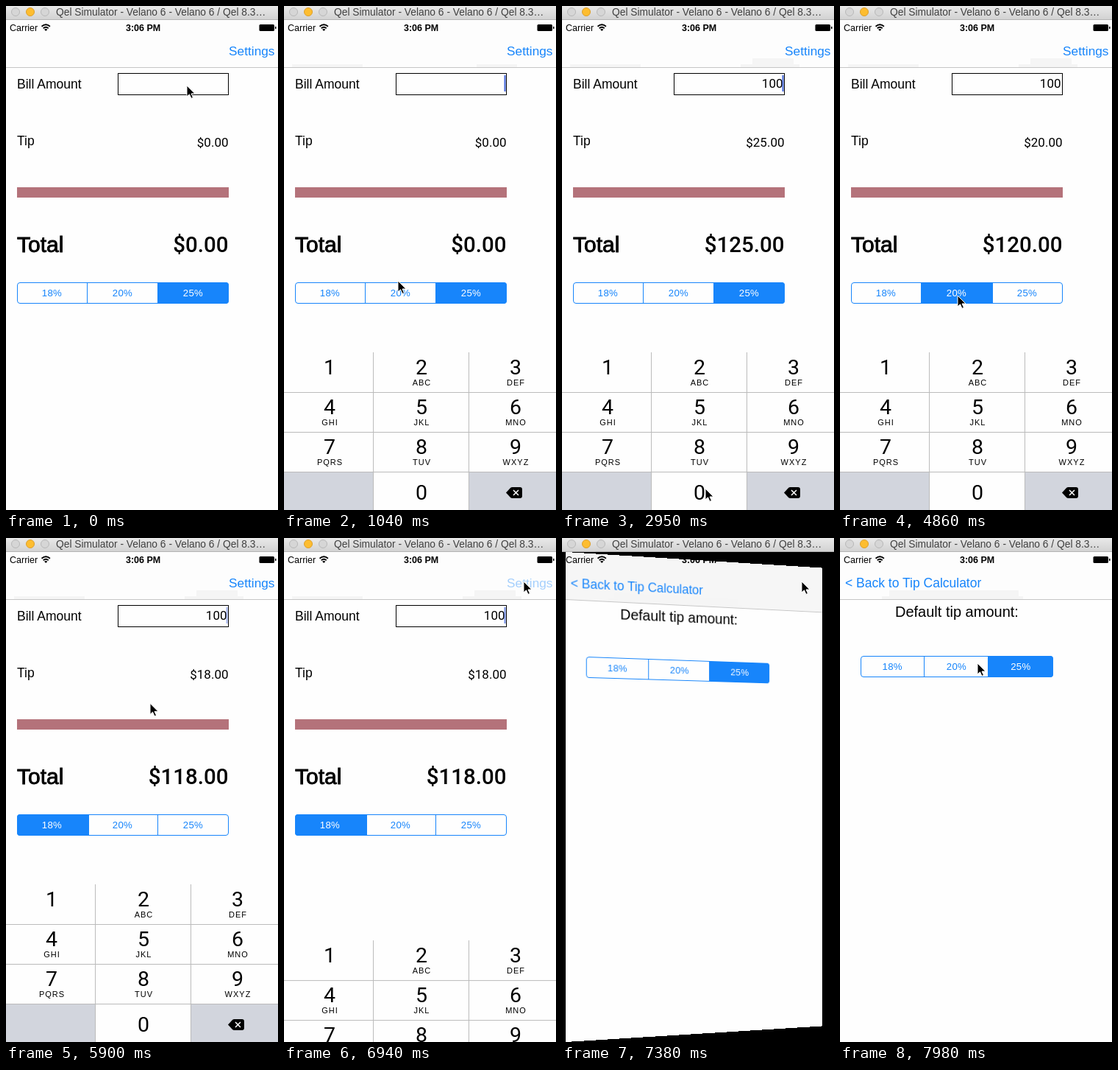
Animation, 370 px wide and 684 px high, one loop 8000 ms. Source, as an HTML page:

```html
<!DOCTYPE html>
<html lang="en">
<head>
<meta charset="utf-8">
<title>Tip calculator</title>
<style>
html, body { margin: 0; width: 370px; height: 684px; overflow: hidden; background: #000; }
svg { position: absolute; left: 0; display: block; overflow: hidden; }
text { font-family: "Liberation Sans", Arial, sans-serif; white-space: pre; }
.num { font-family: Roboto, Arial, sans-serif; }
#screens { position: absolute; top: 19px; width: 370px; height: 665px; overflow: hidden;
  background: #000; perspective: 1185px; perspective-origin: 186px 50%; }
#screens svg { top: 0; backface-visibility: hidden; transform-origin: 186px 50%; }
#top { top: 0; }
</style>
</head>
<body>
<div id="screens"></div>
<svg id="top" width="370" height="684"></svg>
<script>
const BLUE = '#1785fb', GREY = '#d2d5dd', HAZE = '#f5f5f5', LOOP = 8000;
const $ = id => document.getElementById(id);

const rect = (x, y, w, h, fill, more = '') =>
  `<rect x="${x}" y="${y}" width="${w}" height="${h}" fill="${fill}" ${more}/>`;
const text = (x, y, size, str, more = '') =>
  `<text x="${x}" y="${y}" font-size="${size}" ${more}>${str}</text>`;
const END = 'text-anchor="end"', MID = 'text-anchor="middle"', NUM = 'class="num"';

function segments(id, x, y, w, selected) {
  const cell = w / 3, edge = i => i ? Math.floor(x + cell * i) - 1 : x;
  let out = `<clipPath id="${id}">${rect(x, y, w, 29, '#000', 'rx="4"')}</clipPath>` +
    `<g clip-path="url(#${id})">${rect(edge(selected), y, cell + 2, 29, BLUE)}</g>` +
    rect(x + .5, y + .5, w - 1, 28, 'none', `rx="3.5" stroke="${BLUE}"`);
  ['18%', '20%', '25%'].forEach((label, i) => {
    if (i) out += rect(edge(i), y, 1, 29, BLUE);
    out += text(x + cell * (i + .5) - .5, y + 19, 13.2, label,
      `${MID} letter-spacing=".3" fill="${i === selected ? '#fff' : BLUE}"`);
  });
  return out;
}

function keypad() {
  const cols = [62, 187, 315], row = i => 470 + 54 * i;
  const letters = ['', 'ABC', 'DEF', 'GHI', 'JKL', 'MNO', 'PQRS', 'TUV', 'WXYZ'];
  const digit = (x, y, n) => text(x, y, 28.5, n, `${MID} ${NUM}`);
  let out = rect(0, 470, 370, 214, '#fefefe') +
    rect(0, 632, 121, 52, GREY) + rect(252, 632, 118, 52, GREY) +
    rect(0, 470, 121, 54, GREY, 'id="key1"') + rect(122, 633, 129, 51, GREY, 'id="key0"');
  for (let i = 1; i < 4; i++) out += rect(0, row(i), 370, 1, '#bbb');
  for (const x of [121, 251]) out += rect(x, 470, 1, 214, '#bbb');
  letters.forEach((word, i) => {
    const x = cols[i % 3], y = row(Math.floor(i / 3));
    out += digit(x, y + 30, i + 1) + text(x + .5, y + 45, 11, word, `${MID} letter-spacing="1"`);
  });
  return out + digit(187, 670, 0) +
    '<path d="M302 660.5l6-6.5q1-1 2.5-1h10.5q3 0 3 3v9q0 3-3 3h-10.5q-1.5 0-2.5-1z"/>' +
    '<path d="M312 657l7 7m0-7l-7 7" stroke="#fff" stroke-width="1.5"/>';
}

const page = (id, body) =>
  `<svg id="${id}" width="370" height="665" viewBox="0 19 370 665">${rect(0, 19, 370, 665, '#fefefe')}${body}</svg>`;
const nav = id => rect(0, 19, 370, 64, '#fdfdfd', `id="${id}"`) + rect(0, 83, 370, 1, '#c6c6c6');

$('screens').innerHTML = page('calc',
  nav('calcNav') +
  `<g id="haze">${rect(11, 79, 96, 4, HAZE)}${rect(262, 79, 55, 4, HAZE)}</g>` +
  `<g id="amountHaze">${rect(243, 79, 80, 4, HAZE)}${rect(259, 71, 56, 8, HAZE)}</g>` +
  text(365.5, 67, 17.3, 'Settings', `${END} id="settings" fill="${BLUE}"`) +
  text(15, 112, 17.5, 'Bill Amount') +
  rect(152.5, 91.5, 150, 29, '#fefefe', 'stroke="#000"') +
  text(300.5, 111, 17, '', `${END} ${NUM} id="bill"`) +
  rect(299.5, 94, 2, 22, '#4468dd', 'id="caret"') +
  text(15, 189, 17.5, 'Tip') + text(302.5, 191, 17, '', `${END} ${NUM} id="tip"`) +
  rect(15, 246, 288, 14, '#b4727a') +
  text(15, 333.5, 30, 'Total', 'stroke="#000" stroke-width=".9"') +
  text(302.5, 333.5, 29.5, '', `${END} ${NUM} font-weight="500" id="total"`) +
  `<g id="choice"></g><g id="keys">${keypad()}</g>`) +
page('prefs',
  nav('prefsNav') + rect(67, 71, 176, 8, HAZE) + rect(57, 79, 192, 4, HAZE) +
  text(7, 67, 17.5, '&lt; Back to Tip Calculator', `fill="${BLUE}"`) +
  text(75, 107, 20, 'Default tip amount:') +
  segments('prefClip', 28, 160, 262, 2));

const light = (x, fill, line) => `<circle cx="${x}" cy="8" r="5.5" fill="${fill}" stroke="${line}"/>`;
$('top').innerHTML =
  '<linearGradient id="chrome" x2="0" y2="1"><stop stop-color="#e9e9e9"/><stop offset="1" stop-color="#d1d1d1"/></linearGradient>' +
  rect(0, 0, 370, 19, 'url(#chrome)') + rect(0, 18, 370, 1, '#b4b4b4') +
  light(13, '#d6d6d6', '#b8b8b8') + light(33, '#fdbd30', '#dd9f2b') + light(53, '#d6d6d6', '#b8b8b8') +
  text(68, 13, 13.8, 'Qel Simulator - Velano 6 - Velano 6 / Qel 8.3…', 'fill="#404040"') +
  text(5, 33.5, 12.5, 'Carrier') +
  '<path d="M48.5 27.8q5.7-5 11.4 0M50.7 30.3q3.5-3 7 0" fill="none" stroke="#000" stroke-width="1.8"/>' +
  '<path d="M54.2 34l-2.2-2.2q2.2-1.8 4.4 0z"/>' +
  text(163, 33.5, 12.5, '3:06 PM', 'font-weight="bold"') +
  rect(344.5, 25, 20.5, 9, '#000', 'rx="1.5"') + rect(366, 28, 1.5, 3, '#000') +
  '<path id="cursor" d="M0 0V15L3.5 11.8L6 17.4L8.5 16.3L6 11H11z" stroke="#fff"/>';

const clamp = v => Math.min(1, Math.max(0, v));
const easeOut = p => p * (2 - p);
const smooth = p => p * p * (3 - 2 * p);
const span = (t, from, to) => clamp((t - from) / (to - from));
const money = v => '$' + v.toFixed(2);
const show = (id, on) => { $(id).style.display = on ? '' : 'none'; };

// The screen refreshes at a steady, low rate.
const FIRST = 440, STEP = 147.5;
const refresh = t => t < FIRST ? 0 : FIRST + STEP * Math.floor((t - FIRST) / STEP);

// Each glide: leave, arrive, where to.
const glides = [
  { leave: 580, arrive: 1030, x: 155, y: 373 },
  { leave: 1030, arrive: 1480, x: 66, y: 495 },
  { leave: 1770, arrive: 2210, x: 195, y: 655 },
  { leave: 3100, arrive: 4410, x: 160, y: 393 },
  { leave: 4870, arrive: 5300, x: 69, y: 386 },
  { leave: 5600, arrive: 6630, x: 326, y: 59 },
  { leave: 7375, arrive: 7960, x: 187, y: 170 }
];
const presses = [
  { digit: 1, down: 1610, up: 1760 },
  { digit: 0, down: 2200, up: 2340 },
  { digit: 0, down: 2640, up: 2940 }
];

function pointer(t) {
  let x = 246, y = 108;
  for (const g of glides) {
    const k = easeOut(span(t, g.leave, g.arrive));
    x += (g.x - x) * k;
    y += (g.y - y) * k;
  }
  return `translate(${x} ${y})`;
}

function turn(id, deg) {
  const back = 185 * Math.abs(Math.sin(deg * Math.PI / 180));
  $(id).style.transform = deg ? `translateZ(${-back}px) rotateY(${deg}deg)` : 'none';
  show(id, Math.abs(deg) < 90);
}

let drawn = -1;
function draw(t) {
  if (t === drawn) return;
  drawn = t;
  $('cursor').setAttribute('transform', pointer(t));

  const drop = 214 * (1 - easeOut(span(t, 440, 890)) + span(t, 6770, 7220));
  $('keys').setAttribute('transform', `translate(0 ${drop})`);
  const held = presses.find(p => t >= p.down && t < p.up);
  for (const d of [0, 1]) show('key' + d, held && held.digit === d);

  const bill = presses.filter(p => t >= p.up).map(p => p.digit).join('');
  const pick = t < 4700 ? 2 : t < 5450 ? 1 : 0;
  const tip = bill * [.18, .2, .25][pick];
  $('bill').textContent = bill;
  $('tip').textContent = money(tip);
  $('total').textContent = money(+bill + tip);
  $('choice').innerHTML = segments('pickClip', 15, 375, 288, pick);

  const typing = t > 1600 && t < 3200;
  const blink = clamp(.5 + 1.3 * Math.cos((t - 3150) / 500 * Math.PI));
  $('caret').style.opacity = t < 580 ? 0 : typing ? 1 : blink;
  show('haze', t >= 580);
  show('amountHaze', bill);
  $('settings').style.opacity = t < 6630 ? 1 : .38;

  const p = span(t, 6935, 7458), flip = 180 * smooth(p);
  turn('calc', -flip);
  turn('prefs', 180 - flip);
  $('prefsNav').setAttribute('fill', p < 1 ? '#f6f6f6' : '#fdfdfd');
}

const start = performance.now();
function tick() {
  draw(refresh((performance.now() - start) % LOOP));
  requestAnimationFrame(tick);
}
tick();
</script>
</body>
</html>
```
